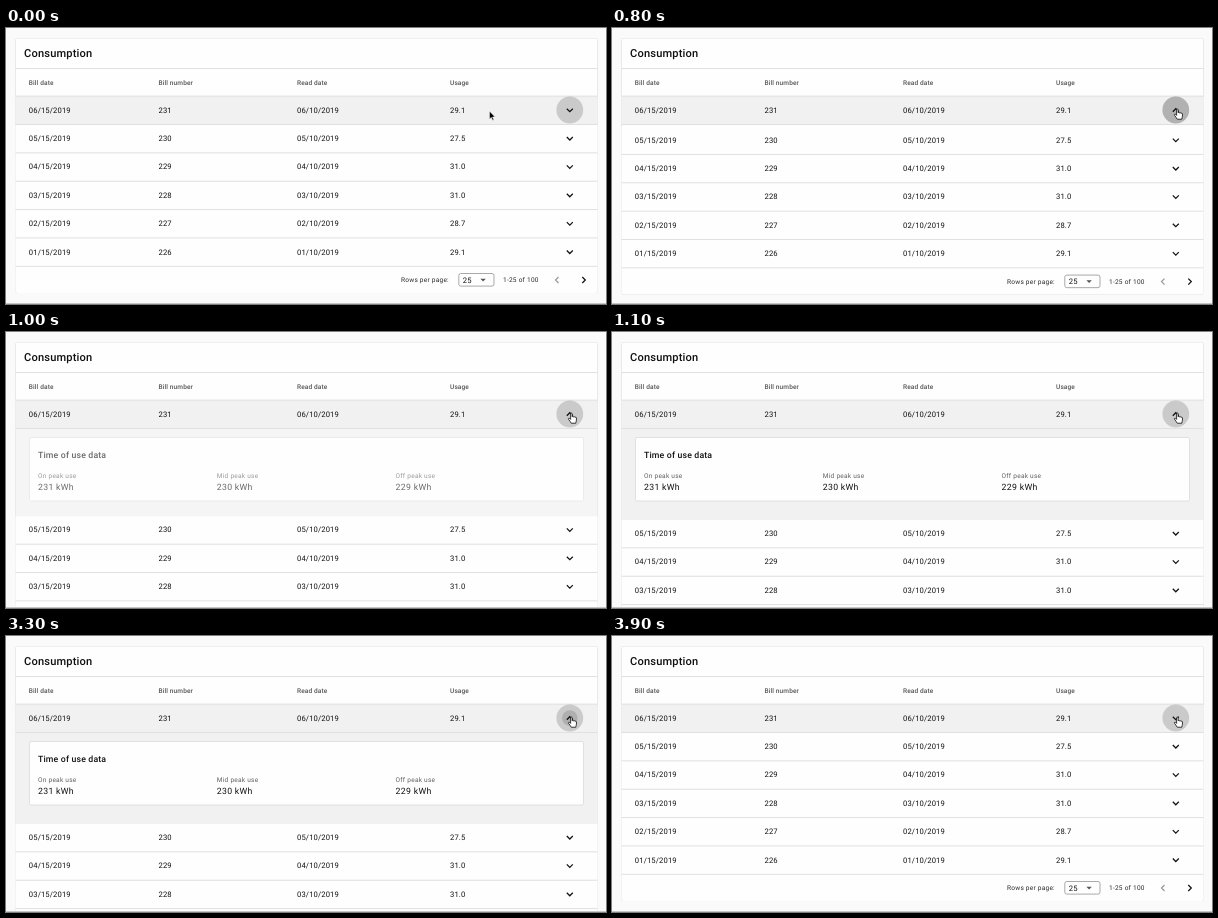
These frames come from a looping animation (600 px wide and 276 px high, 5 s). An HTML page:

```html
<!DOCTYPE html>
<html lang="en">
<head>
<meta charset="utf-8">
<title>Consumption table</title>
<style>
  html, body { margin: 0; width: 100%; height: 100%; overflow: hidden; background: #fafafa; }
  svg { display: block; width: 100vw; height: 100vh; }
  text { font-family: Roboto, Arial, sans-serif; fill: #111; white-space: pre; text-rendering: geometricPrecision; }
  .title { font-size: 11.1px; font-weight: 500; letter-spacing: .17px; }
  .head { font-size: 6.54px; font-weight: 500; letter-spacing: .12px; fill: #555; }
  .cell { font-size: 7.63px; letter-spacing: .14px; }
  .sub { font-size: 8.73px; font-weight: 500; letter-spacing: .16px; }
  .label { font-size: 6.54px; letter-spacing: .25px; fill: #606060; }
  .value { font-size: 8.73px; letter-spacing: .3px; }
  .foot { font-size: 6.54px; letter-spacing: .24px; fill: #2a2a2a; }
  .line { fill: #e0e0e0; }
  .icon { fill: none; stroke: #111; stroke-width: 1.25; }
  #card { fill: #fefefe; filter: drop-shadow(0 .6px .5px rgba(0, 0, 0, .3)); }
</style>
</head>
<body>
<svg id="stage" viewBox="0 0 600 276">
  <rect width="600" height="276" fill="#fafafa"/>
  <rect id="card" x="9.5" y="10.3" width="582" rx="2"/>
  <g id="top"></g>
  <g id="panel">
    <rect x="9.5" y="97" width="582" height="91" fill="#f1f1f1"/>
    <rect x="23.5" y="105.5" width="554" height="63.5" rx="1.5" fill="#fefefe" stroke="#e0e0e0"/>
  </g>
  <g id="tail"><rect x="9.5" y="97" width="582" height="167" fill="#fefefe"/></g>
  <circle cx="563.8" cy="82" r="13.4" fill-opacity=".16"/>
  <circle id="ripple" cx="563.8" cy="82"/>
  <g id="toggle"></g>
  <path id="arrow" d="M0 0V8.2L1.9 6.5 3.2 9.4 4.5 8.8 3.2 6H5.8Z" stroke="#fff" stroke-width=".6"/>
  <g id="hand">
    <path transform="scale(1.1)" fill="#fff" stroke="#111" stroke-width=".75" stroke-linejoin="round"
      d="M-.8 .7C-.8-.2 .6-.2 .6 .7V3.5C.8 2.9 1.9 3 2 3.7 2.3 3.2 3.2 3.3 3.3 4 3.7 3.6 4.5 3.8 4.5 4.6V6.5C4.5 7.5 3.9 8 3.9 9.3H-.2C-.6 8.1-2 7-2.7 5.7-3.2 4.9-2.3 4.3-1.7 4.9L-.8 5.8Z"/>
  </g>
  <rect y="275" width="600" height="1" fill="#c6c6c6"/>
</svg>
<script>
const LOOP = 5000, TICK = 100, OPEN = 91, ROW = 28.36, FIRST = 82;
const COLS = [22.8, 152.5, 291, 444];
const $ = id => document.getElementById(id);
const clamp = v => Math.min(1, Math.max(0, v));
const mix = (a, b, p) => a + (b - a) * p;
const progress = (t, start, length) => clamp((t - start) / length);

function add(parent, tag, attrs, content) {
  const el = document.createElementNS(parent.namespaceURI, tag);
  for (const k in attrs) el.setAttribute(k, attrs[k]);
  if (content) el.textContent = content;
  return parent.appendChild(el);
}
const text = (parent, cls, x, y, s) => add(parent, "text", { class: cls, x, y }, s);
const rule = (parent, y) => add(parent, "rect", { class: "line", x: 9.5, y, width: 582, height: 1 });
const chevron = (parent, x, y, turn = 0) => add(parent, "path", {
  class: "icon", d: "M-3-1.5L0 1.5 3-1.5", transform: `translate(${x} ${y}) rotate(${turn})`
});

const head = $("top"), tail = $("tail"), panel = $("panel");
text(head, "title", 18, 29.1, "Consumption");
rule(head, 40);
["Bill date", "Bill number", "Read date", "Usage"].forEach((s, i) => text(head, "head", COLS[i], 57.1, s));
add(head, "rect", { x: 9.5, y: 68, width: 582, height: 29, fill: "#f1f1f1" });
rule(head, 67.6);

["29.1", "27.5", "31.0", "31.0", "28.7", "29.1"].forEach((usage, i) => {
  const group = i ? tail : head, y = FIRST + ROW * i, month = `0${6 - i}`;
  [`${month}/15/2019`, `${231 - i}`, `${month}/10/2019`, usage]
    .forEach((s, c) => text(group, "cell", COLS[c], y + 2.75, s));
  if (i) chevron(group, 563.8, y + .2);
  rule(group, y + 14);
});

["On", "Mid", "Off"].forEach((s, i) => {
  const x = 32 + 178.8 * i;
  text(panel, "label", x, 145.7, `${s} peak use`);
  text(panel, "value", x, 157.6, `${231 - i} kWh`);
});
text(panel, "sub", 32, 125.8, "Time of use data");

text(tail, "foot", 395, 254.4, "Rows per page:");
add(tail, "rect", { x: 452.8, y: 245.5, width: 35.2, height: 12.6, rx: 2, fill: "none", stroke: "#a0a0a0", "stroke-width": .9 });
text(tail, "cell", 456.8, 254.8, "25");
add(tail, "path", { d: "M474.4 250.7h5.4l-2.7 2.7z", fill: "#555" });
text(tail, "foot", 497, 254.4, "1-25 of 100");
chevron(tail, 551, 252, 90).style.stroke = "#999";
chevron(tail, 577.8, 252, -90);
const toggle = chevron($("toggle"), 563.8, 82.2);

// Solves cubic-bezier(.4, 0, .2, 1) for y at x.
function ease(x) {
  let lo = 0, hi = 1;
  for (let i = 0; i < 24; i++) {
    const s = (lo + hi) / 2, r = 1 - s;
    if (1.2 * r * r * s + .6 * r * s * s + s ** 3 < x) lo = s; else hi = s;
  }
  return 3 * lo * lo - 2 * lo ** 3;
}

function draw(t) {
  const open = ease(progress(t, 775, 300)) - ease(progress(t, 3374, 225));
  const shift = OPEN * open;
  tail.setAttribute("transform", `translate(0 ${shift})`);
  $("card").setAttribute("height", 254.8 + shift);
  panel.setAttribute("opacity", open > .98 ? 1 : open * .64);
  const up = t >= 800 && t < 3400;
  toggle.setAttribute("transform", `translate(563.8 82.2) rotate(${up ? 180 : 0})`);

  const age = t - (t < 3000 ? 620 : 3275);
  $("ripple").setAttribute("r", age < 0 ? 0 : Math.min(13.4, 6 + age * .0725));
  $("ripple").setAttribute("fill-opacity", .13 * (1 - progress(age, 170, 180)));

  const p = progress(t, 0, 600), q = p * p * (3 - 2 * p);
  const x = mix(483.4, 565.5, q), y = mix(83, 81, q), over = x > 550;
  $("arrow").setAttribute("visibility", over ? "hidden" : "visible");
  $("hand").setAttribute("visibility", over ? "visible" : "hidden");
  $(over ? "hand" : "arrow").setAttribute("transform", `translate(${x} ${y})`);
}

const start = performance.now();
function frame() {
  const t = (performance.now() - start) % LOOP;
  draw(Math.floor(t / TICK) * TICK);
  requestAnimationFrame(frame);
}
frame();
</script>
</body>
</html>
```
